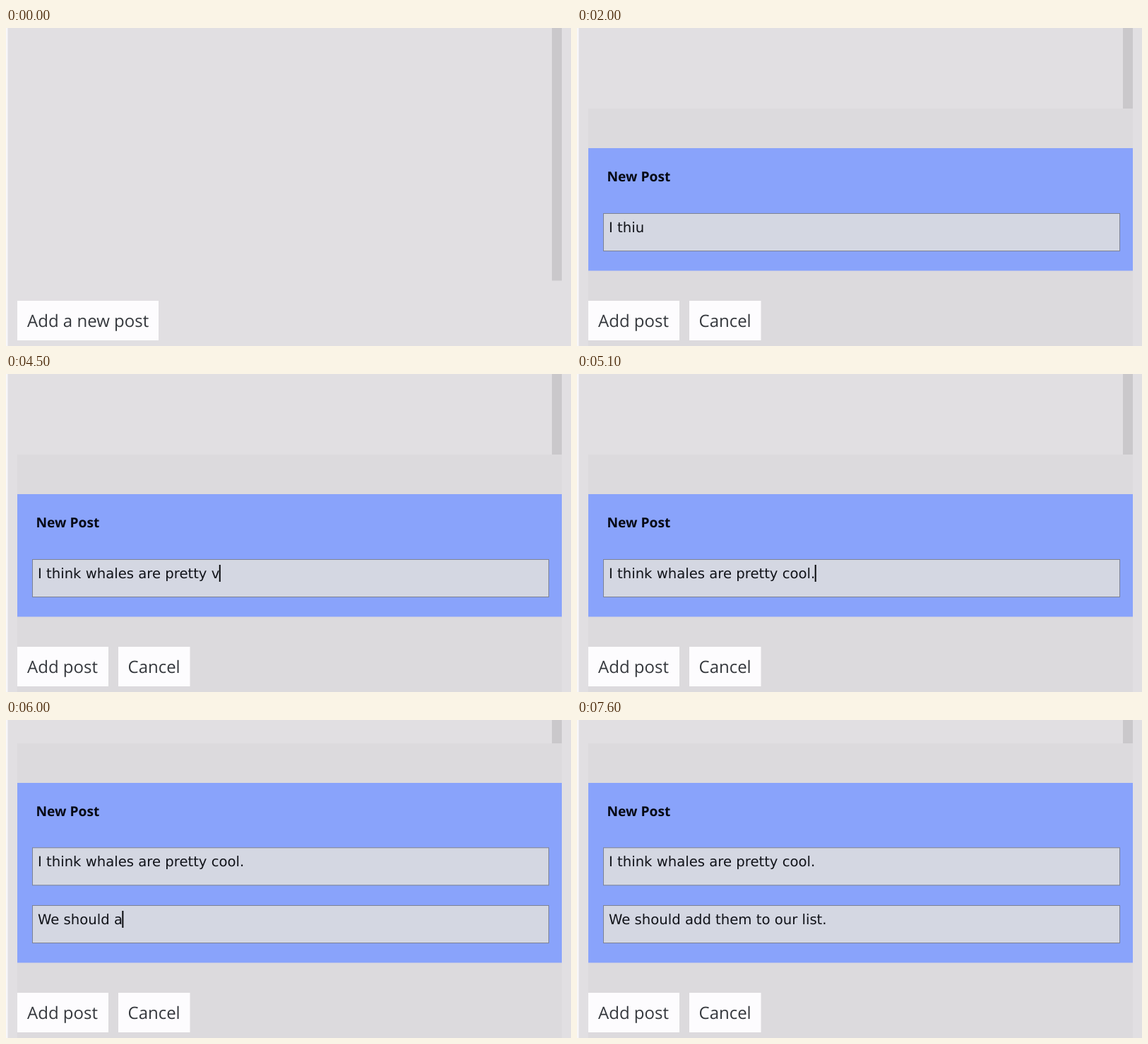
An HTML page for the animation above (8000 ms loop, 800 by 450 pixels).

```html
<!DOCTYPE html>
<html lang="en">
<head>
<meta charset="utf-8">
<title>Adding a post</title>
<style>
  html, body { margin: 0; width: 100%; height: 100%; overflow: hidden; background: #e1dfe2; }
  svg { display: block; width: 800px; height: 450px; }
  text { text-rendering: geometricPrecision; white-space: pre; }
  .label { font: 24px "Open Sans", sans-serif; fill: #35383d; }
  .heading { font: bold 19.2px "Open Sans", sans-serif; fill: #060914; }
  .entry { font: 19.65px "DejaVu Sans", sans-serif; fill: #101218; }
  .hint { fill: #70747d; }
  .button { fill: #fdfcfe; }
  .field { fill: #d4d7e2; stroke: #7d8294; }
</style>
</head>
<body>
<svg viewBox="0 0 800 450">
  <rect width="800" height="450" fill="#e1dfe2"/>
  <rect width="2.5" height="450" fill="#f8f7f9"/>
  <rect id="bar" x="773" width="14" fill="#cac8cb"/>

  <g id="closed">
    <rect class="button" x="16" y="386" width="200" height="56"/>
    <text class="label" x="30" y="423">Add a new post</text>
  </g>

  <g id="form">
    <rect id="area" x="16" width="771" fill="#dcdadd"/>
    <rect id="panel" x="16" width="771" fill="#89a3fb"/>
    <text id="heading" class="heading" x="42.5">New Post</text>
    <g id="firstBlock">
      <rect class="field" x="37.5" y="180.5" width="731" height="53"/>
      <text class="entry" x="45" y="207">I think whales are pretty cool.</text>
    </g>
    <rect class="field" x="37.5" y="262.5" width="731" height="53"/>
    <text id="entry" class="entry" x="45" y="289" xml:space="preserve"></text>
    <rect id="caret" y="270" width="2" height="24" fill="#08090c"/>
    <rect class="button" x="16" y="386" width="129" height="56"/>
    <text class="label" x="30" y="423">Add post</text>
    <rect class="button" x="159" y="386" width="101.5" height="56"/>
    <text class="label" x="172.5" y="423">Cancel</text>
  </g>

  <path id="pointer" d="M0 0V17L4 13.5 7.5 21 10.5 19.5 7 12.5H12Z"
        fill="#2b2c30" stroke="#f2f1f3" stroke-width="1"/>
</svg>
<script>
const LOOP = 8000, OPEN = 600, SPLIT = 5160, BLINK = 400;
const $ = id => document.getElementById(id);
const set = (id, attrs) => {
  for (const name in attrs) $(id).setAttribute(name, attrs[name]);
};
const show = (id, on) => set(id, { visibility: on ? 'visible' : 'hidden' });

// Every keystroke becomes a { time, text } state of the active block.
const states = [{ time: OPEN, text: '' }];
const latest = () => states[states.length - 1].text;
function type(start, gap, letters) {
  [...letters].forEach((letter, i) =>
    states.push({ time: start + i * gap, text: latest() + letter }));
}
function backspace(time) {
  states.push({ time, text: latest().slice(0, -1) });
}

type(1180, 100, 'I t');
type(1530, 30, 'hiu');
backspace(2150);
type(2230, 79, 'nk whales are ');
type(3400, 148, 'pretty v');
backspace(4560);
type(4640, 100, 'cool.');
states.push({ time: SPLIT, text: '' });
type(5330, 64, 'We should a');
type(6030, 61, 'dd them to our list.');

const firstKey = states[1].time;

function drawPointer(t) {
  show('pointer', t >= 400 && t < firstKey);
  const k = 1 - Math.min(1, Math.max(0, (t - 400) / 180));
  const left = k * k;
  set('pointer', { transform: `translate(${113 + 40 * left} ${413 - 30 * left})` });
}

function drawForm(t) {
  const { time, text } = states.findLast(s => s.time <= t) || states[0];
  const split = t >= SPLIT;
  const nudge = split && !text ? 1 : 0;   // the empty block is a pixel taller
  const top = (split ? 33 : 114) - nudge;

  set('bar', { height: top });
  set('area', { y: top, height: 450 - top });
  set('panel', { y: top + 56, height: 287.5 - top + 0 });
  $('panel').setAttribute('height', 343.5 - (top + 56));
  set('heading', { y: top + 102.5 });
  show('firstBlock', split);
  const [field, line] = $('firstBlock').children;
  field.setAttribute('y', 180.5 - nudge + (split ? 0.3 : 0));
  field.setAttribute('height', 53 + nudge);
  line.setAttribute('y', 207 - nudge);

  const entry = $('entry');
  entry.textContent = text || 'New block';
  entry.classList.toggle('hint', !text);
  set('caret', { x: text ? 44.4 + entry.getComputedTextLength() : 45.5 });
  show('caret', Math.floor((t - time) / BLINK) % 2 === 0);
}

function draw(now) {
  const t = now % LOOP, open = t >= OPEN;
  $('closed').style.display = open ? 'none' : '';
  $('form').style.display = open ? '' : 'none';
  if (open) drawForm(t);
  else set('bar', { height: 357.5 });
  drawPointer(t);
  requestAnimationFrame(draw);
}

const start = performance.now();
const tick = () => {
  render(performance.now() - start);
  requestAnimationFrame(tick);
};
function render(elapsed) {
  const t = elapsed % LOOP, open = t >= OPEN;
  $('closed').style.display = open ? 'none' : '';
  $('form').style.display = open ? '' : 'none';
  if (open) drawForm(t);
  else set('bar', { height: 357.5 });
  drawPointer(t);
}
tick();
</script>
</body>
</html>
```
